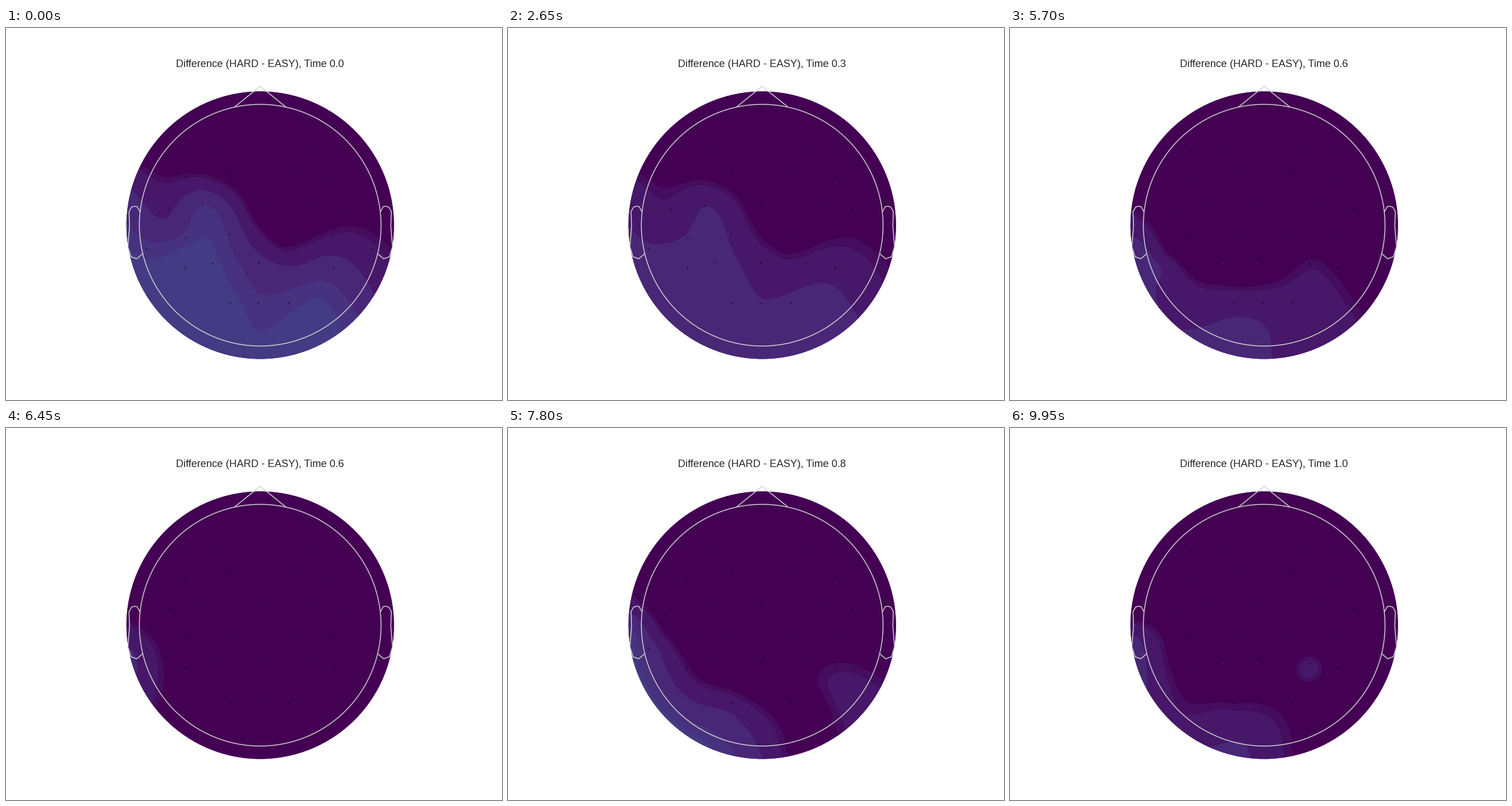
Animation of 864x648 px, one loop 10 s. Source, as a matplotlib script:

```python
import numpy as np
import matplotlib.pyplot as plt
from matplotlib.animation import FuncAnimation
from matplotlib.patches import Circle

W, H, DPI = 864, 648, 135
FRAMES, INTERVAL = 200, 50
CX, CY = 442.8, 343.5
SCALP_R, HEAD_R = 233, 210.5
LINE = dict(color="#d3d3d3", lw=0.8, zorder=3)

LEVELS = [-100, 0, 0.25, 1.25, 2.25, 2.75, 3.25, 100]
COLORS = ["#440154", "#450d5d", "#471769", "#482777", "#46327e", "#433b83", "#404588"]

# Left half of the electrode cap; the right half mirrors it.
MIRROR_X = 441
LEFT_ELECTRODES = [(382, 120), (304, 202), (359, 202), (237, 240), (311, 258),
                   (390, 252), (284, 316), (342, 309), (313, 365), (389, 359),
                   (244, 384), (312, 417), (360, 410), (390, 479)]
MIDLINE = [(441, 304), (440, 409), (439, 479)]

gx, gy = np.meshgrid(np.arange(206, 682, 4), np.arange(107, 583, 4))


def kernel(ax, ay, bx, by):
    d2 = (ax[:, None] - bx) ** 2 + (ay[:, None] - by) ** 2
    return d2 * np.log(d2 + 1e-12)


def spline_field(contours):
    """Thin-plate spline through key points given per level, over a quiet front."""
    contours = {-2: [(300, 180), (443, 200), (600, 220), (510, 285)], **contours}
    x, y, v = np.array([(px, py, lev) for lev, pts in contours.items() for px, py in pts]).T
    x, y = (x - CX) / 100, (y - CY) / 100
    u, w = (gx.ravel() - CX) / 100, (gy.ravel() - CY) / 100
    plane = np.column_stack([np.ones_like(x), x, y])
    system = np.block([[kernel(x, y, x, y), plane], [plane.T, np.zeros((3, 3))]])
    coef = np.linalg.solve(system, np.append(v, np.zeros(3)))
    basis = np.column_stack([kernel(u, w, x, y), np.ones_like(u), u, w])
    return np.clip(basis @ coef, -2, 3.6).reshape(gx.shape)


def bump(x, y, radius, height):
    return np.maximum(height - ((gx - x) ** 2 + (gy - y) ** 2) / radius ** 2, -2)


QUIET = np.full(gx.shape, -0.5)
SPOT = bump(342, 311, 33, 1)
RIM = bump(250, 515, 200, 0.36)

BROAD = spline_field({
    0: [(275, 260), (375, 267), (425, 323), (480, 382), (590, 346), (672, 387)],
    1.25: [(217, 280), (278, 333), (347, 284), (400, 325), (460, 405), (555, 398), (641, 465)],
    2.25: [(211, 342), (305, 361), (346, 308), (390, 378), (437, 462), (545, 441), (612, 503)],
    2.75: [(300, 386), (360, 377), (410, 480), (414, 575), (480, 510), (545, 472)],
    3: [(235, 425), (300, 500)]})

EAR = spline_field({
    -1: [(330, 390), (340, 520), (550, 500)],
    0: [(214, 337), (262, 378), (273, 410), (264, 487)],
    1.25: [(220, 388), (228, 415)]})

TWO_SIDED = spline_field({
    -1: [(513, 480), (620, 370)],
    0: [(217, 291), (270, 355), (335, 440), (420, 473), (470, 515), (489, 571),
        (650, 437), (590, 410), (540, 445), (575, 533)],
    0.7: [(605, 480)],
    1.25: [(214, 322), (262, 385), (320, 475), (385, 496), (442, 575)],
    2.25: [(213, 345), (240, 410)]})

BACK = spline_field({
    0: [(215, 293), (270, 350), (335, 420), (400, 434), (455, 418), (500, 380),
        (565, 383), (633, 475)],
    1.25: [(213, 318), (275, 397), (375, 452), (470, 445), (525, 409), (610, 502)],
    2.25: [(212, 345), (272, 405), (300, 460), (390, 472), (440, 474), (522, 563)],
    2.9: [(290, 510)],
    3.25: [(230, 380), (240, 440), (375, 527), (418, 530)]})

LOW_LEFT = np.maximum(bump(521, 420, 31, 0.5), spline_field({
    -1: [(440, 420), (600, 450)],
    0: [(213, 335), (274, 405), (305, 475), (390, 480), (455, 488), (491, 571)],
    0.25: [(264, 395), (300, 496), (360, 492), (470, 530)],
    0.8: [(300, 530), (440, 545)],
    1.25: [(220, 365), (238, 425), (380, 548), (404, 548)]}))

# Activity swells and fades linearly between these states.
KEYS = [(0, BROAD), (1, BROAD), (6, QUIET), (13, QUIET), (17, SPOT), (21, QUIET),
        (23, QUIET), (28, TWO_SIDED - 0.5), (33, 0.5 * EAR - 0.1), (48, BROAD - 0.2),
        (63, QUIET), (74, QUIET), (81, LOW_LEFT), (88, QUIET),
        (97, QUIET), (98, RIM), (99, QUIET), (107, QUIET), (118, BACK - 0.8),
        (129, EAR), (143, BROAD - 0.8), (156, TWO_SIDED), (165, BROAD - 0.5),
        (175, BACK), (199, LOW_LEFT)]


def field_at(frame):
    for (start, a), (end, b) in zip(KEYS, KEYS[1:]):
        if frame <= end:
            k = (frame - start) / (end - start)
            return (1 - k) * a + k * b


fig = plt.figure(figsize=(W / DPI, H / DPI), dpi=DPI, facecolor="white")
ax = fig.add_axes([0, 0, 1, 1])
ax.set_xlim(0, W)
ax.set_ylim(H, 0)
ax.axis("off")

scalp = ax.add_patch(Circle((CX, CY), SCALP_R, fc=COLORS[0], ec="none", zorder=0))
ax.add_patch(Circle((CX, CY), HEAD_R, fill=False, ec=LINE["color"], lw=LINE["lw"], zorder=3))
ax.plot([CX - 44, CX, CX + 44], [137, 101.5, 137], **LINE)
ear_x = np.array([209.5, 214.5, 219, 224, 228.5, 227.5, 230.5, 225, 215, 205])
ear_y = [320, 311, 310.5, 312, 320, 345, 381, 398.5, 402, 393.5]
for side in (-1, 1):
    ax.plot(CX + side * ear_x, ear_y, **LINE)

electrodes = LEFT_ELECTRODES + MIDLINE + [(2 * MIRROR_X - x, y) for x, y in LEFT_ELECTRODES]
ax.plot(*np.transpose(electrodes), "o", color="black", ms=1.1, mew=0, zorder=2)
title = ax.text(CX, 68, "", ha="center", va="baseline", color="0.15",
                fontname="Liberation Sans", fontsize=9.6)
drawn = []


def update(frame):
    while drawn:
        drawn.pop().remove()
    bands = ax.contourf(gx, gy, field_at(frame), levels=LEVELS, colors=COLORS, zorder=1)
    bands.set_clip_path(scalp)
    drawn.append(bands)
    title.set_text(f"Difference (HARD - EASY), Time {(frame + 10) // 20 / 10:.1f}")
    return bands, title


anim = FuncAnimation(fig, update, frames=FRAMES, interval=INTERVAL, repeat=True, repeat_delay=0)
plt.show()
```
